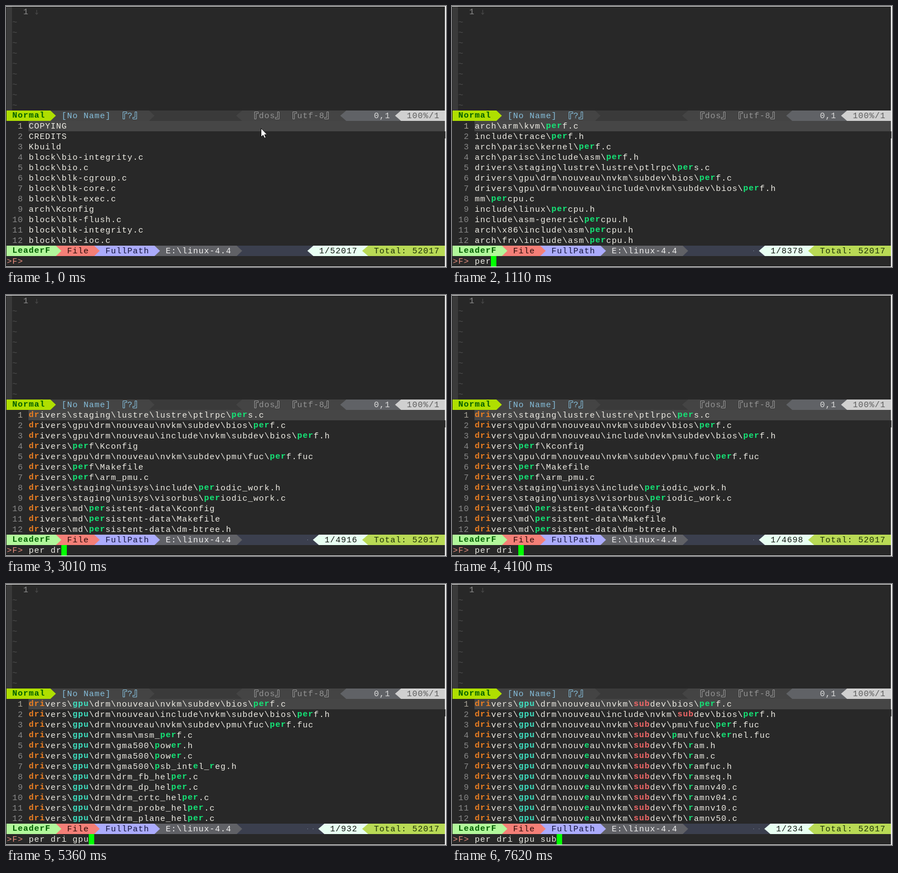
Animation, 803 px wide and 477 px high, one loop 8 s. Source, as an HTML page:

```html
<!DOCTYPE html>
<html lang="en">
<head>
<meta charset="utf-8">
<title>Fuzzy file finder</title>
<style>
html, body { margin: 0; width: 100%; height: 100%; overflow: hidden; background: #282828; }
svg { display: block; width: 803px; height: 477px; }
text { font: 15px "Liberation Mono", "Courier New", monospace; letter-spacing: 0.9985px; white-space: pre; }
.b, .per, .dri, .gpu, .sub { font-weight: bold; }
.per, .dri, .gpu, .sub { baseline-shift: 1px; }
.b { transform: translateY(-1px); }
.per { fill: #14e878; }
.dri { fill: #ec7f22; }
.gpu { fill: #3fe3c3; }
.sub { fill: #f26868; }
</style>
</head>
<body>
<svg id="stage" viewBox="0 0 803 477"></svg>
<script>
const LOOP = 8000;
const X = col => 1 + 10 * col;
const Y = row => 1 + 19 * row;
const lines = strings => strings.raw[0].trim().split("\n");

// Match markers: {per} (gpu) <sub>; the "dri" prefix is marked when drawn.
const start = lines`
COPYING
CREDITS
Kbuild
block\bio-integrity.c
block\bio.c
block\blk-cgroup.c
block\blk-core.c
block\blk-exec.c
arch\Kconfig
block\blk-flush.c
block\blk-integrity.c
block\blk-ioc.c`;

const per = lines`
arch\arm\kvm\{per}f.c
include\trace\{per}f.h
arch\parisc\kernel\{per}f.c
arch\parisc\include\asm\{per}f.h
drivers\staging\lustre\lustre\ptlrpc\{per}s.c
drivers\gpu\drm\nouveau\nvkm\subdev\bios\{per}f.c
drivers\gpu\drm\nouveau\include\nvkm\subdev\bios\{per}f.h
mm\{per}cpu.c
include\linux\{per}cpu.h
include\asm-generic\{per}cpu.h
arch\x86\include\asm\{per}cpu.h
arch\frv\include\asm\{per}cpu.h`;

const dri = lines`
drivers\staging\lustre\lustre\ptlrpc\{per}s.c
drivers\gpu\drm\nouveau\nvkm\subdev\bios\{per}f.c
drivers\gpu\drm\nouveau\include\nvkm\subdev\bios\{per}f.h
drivers\{per}f\Kconfig
drivers\gpu\drm\nouveau\nvkm\subdev\pmu\fuc\{per}f.fuc
drivers\{per}f\Makefile
drivers\{per}f\arm_pmu.c
drivers\staging\unisys\include\{per}iodic_work.h
drivers\staging\unisys\visorbus\{per}iodic_work.c
drivers\md\{per}sistent-data\Kconfig
drivers\md\{per}sistent-data\Makefile
drivers\md\{per}sistent-data\dm-btree.h`;

const g = lines`
drivers\(g)pu\drm\nouveau\nvkm\subdev\bios\{per}f.c
drivers\(g)pu\drm\nouveau\include\nvkm\subdev\bios\{per}f.h
drivers\(g)pu\drm\nouveau\nvkm\subdev\pmu\fuc\{per}f.fuc
drivers\(g)pu\drm\msm\msm_{per}f.c
drivers\sta(g)ing\lustre\lustre\ptlrpc\{per}s.c
drivers\{per}f\Kconfi(g)
drivers\clk\tegra\clk-{per}iph-(g)ate.c
drivers\devfreq\(g)overnor_{per}formance.c
drivers\sta(g)ing\unisys\include\{per}iodic_work.h
drivers\sta(g)ing\unisys\visorbus\{per}iodic_work.c
drivers\md\{per}sistent-data\Kconfi(g)
drivers\md\{per}sistent-data\dm-block-mana(g)er.c`;

const gpu = lines`
drivers\(gpu)\drm\nouveau\nvkm\subdev\bios\{per}f.c
drivers\(gpu)\drm\nouveau\include\nvkm\subdev\bios\{per}f.h
drivers\(gpu)\drm\nouveau\nvkm\subdev\pmu\fuc\{per}f.fuc
drivers\(gpu)\drm\msm\msm_{per}f.c
drivers\(gpu)\drm\gma500\{p}ow{er}.h
drivers\(gpu)\drm\gma500\{p}ow{er}.c
drivers\(gpu)\drm\gma500\{p}sb_int{e}l_{r}eg.h
drivers\(gpu)\drm\drm_fb_hel{per}.c
drivers\(gpu)\drm\drm_dp_hel{per}.c
drivers\(gpu)\drm\drm_crtc_hel{per}.c
drivers\(gpu)\drm\drm_probe_hel{per}.c
drivers\(gpu)\drm\drm_plane_hel{per}.c`;

const kernel = String.raw`drivers\(gpu)\drm\nouveau\nvkm\<s>ubdev\{p}mu\fuc\k{er}nel.fuc`;
const sdvo = String.raw`drivers\(gpu)\drm\gma500\{p}sb_int{e}l_<s>dvo_{r}egs.h`;
const markS = row => row.includes("subdev")
  ? row.replace("subdev", "<s>ubdev") : row.replace("drivers", "driver<s>");
const s = [...gpu.slice(0, 6).map(markS), kernel, sdvo, ...gpu.slice(6, 10).map(markS)];
const su = s.map(row => row.includes("<s>ubdev")
  ? row.replace("<s>u", "<su>")
  : row.replace("<s>dvo", "sdvo").replace(/^driver(s|<s>)\\\(gpu\)/, "driver<s>\\(gp)<u>"));
const ram = "am.h am.c amfuc.h amseq.h amnv40.c amnv04.c amnv10.c amnv50.c".split(" ")
  .map(end => String.raw`drivers\(gpu)\drm\nouv{e}au\nvkm\<sub>dev\fb\{r}` + end);
const sub = [...s.slice(0, 3), kernel].map(row => row.replace("<s>ub", "<sub>")).concat(ram);
const swap = (rows, from, to) => rows.map(row => row.replace(from, to));

// [time, query, cursor shown, matches, rows]
const steps = [
  [0, "", 0, 52017, start],
  [410, "", 1, 52017, start],
  [720, "p", 1, 31264, swap(per, "{per}", "{p}er")],
  [840, "pe", 1, 21873, swap(per, "{per}", "{pe}r")],
  [1110, "per", 1, 8378, per],
  [1640, "per", 0, 8378, per],
  [1910, "per ", 1, 8378, per],
  [2370, "per ", 0, 8378, per],
  [2640, "per d", 1, 6142, dri],
  [3010, "per dr", 1, 4916, dri],
  [3290, "per dri", 1, 4698, dri],
  [3820, "per dri", 0, 4698, dri],
  [4100, "per dri ", 1, 4698, dri],
  [4500, "per dri ", 0, 4698, dri],
  [4780, "per dri g", 1, 1794, g],
  [5090, "per dri gp", 1, 1013, swap(gpu, "(gpu)", "(gp)u")],
  [5360, "per dri gpu", 1, 932, gpu],
  [5920, "per dri gpu", 0, 932, gpu],
  [6230, "per dri gpu ", 1, 932, gpu],
  [6820, "per dri gpu s", 1, 931, s],
  [7190, "per dri gpu su", 1, 931, su],
  [7620, "per dri gpu sub", 1, 234, sub]
];

const rect = (x, y, w, h, fill) =>
  `<rect x="${x}" y="${y}" width="${w}" height="${h}" fill="${fill}"/>`;
const text = (col, row, str, fill, cls = "") =>
  `<text x="${X(col) + 0.5}" y="${Y(row) + 14}" fill="${fill}" class="${cls}">${str}</text>`;

// Status segment whose slanted end points right (dir 1) or left (dir -1).
function segment(from, to, row, fill, dir) {
  const a = X(from), b = X(to), y = Y(row);
  const [flat, edge, tip] = dir > 0 ? [a, b, b + 10] : [b, a, a - 11];
  return `<path fill="${fill}" d="M${flat} ${y}H${edge}L${tip} ${y + 9.5}L${edge} ${y + 19}H${flat}z"/>`;
}

function bracketed(col, str, fill) {
  const hook = (c, turn) => `<path transform="translate(${X(c)} 191)${turn}" fill="none" stroke="${fill}" d="M2.5 15.5V2.5H9.5V5.5H5.5V15.5z"/>`;
  return hook(col, "") + text(col + 1, 10, str, fill)
    + hook(col + 1 + str.length, " rotate(180 5 9)");
}

function backdrop() {
  let out = rect(0, 0, 803, 477, "#282828") + rect(1, 1, 10, 190, "#3a3a3a")
    + text(3, 0, "1", "#8e8e8e")
    + '<path d="M56 7V15M53.5 12.5L56 15.5L58.5 12.5" fill="none" stroke="#505050"/>';
  for (let i = 1; i < 10; i++) out += text(1, i, "~", "#505050");

  out += rect(1, 191, 800, 19, "#3a3a3a")
    + segment(8, 26, 10, "#444444", 1) + segment(0, 8, 10, "#afdf00", 1)
    + text(1, 10, "Normal", "#005f00", "b")
    + text(10, 10, "[No Name]", "#86bfdc") + bracketed(21, "?", "#86bfdc")
    + segment(43, 80, 10, "#444444", -1)
    + bracketed(45, "dos", "#959595") + bracketed(52, "utf-8", "#959595")
    + segment(62, 80, 10, "#606266", -1) + text(67, 10, "0,1", "#dcdcdc")
    + segment(72, 80, 10, "#d0d0d0", -1) + text(73, 10, "100%/1", "#5c5c5c");

  out += rect(41, 210, 760, 19, "#464646");
  for (let i = 1; i <= 12; i++)
    out += text(1, 10 + i, String(i).padStart(2), i > 1 ? "#8a8a8a" : "#aaa69a");

  out += rect(1, 438, 800, 19, "#3b3f4e")
    + segment(27, 42, 23, "#606166", 1) + text(29, 23, "E:\\linux-4.4", "#f0f0f0")
    + segment(16, 27, 23, "#ababfc", 1) + text(18, 23, "FullPath", "#14143c")
    + segment(9, 16, 23, "#f47f77", 1) + text(11, 23, "File", "#280a08")
    + segment(0, 9, 23, "#b2f79b", 1) + text(1, 23, "LeaderF", "#005f00", "b");
  return out + text(0, 24, "&gt;F&gt;", "#ea9080")
    + rect(0, 0, 803, 1, "#f0f0f0") + rect(0, 476, 803, 1, "#f0f0f0")
    + rect(801, 0, 2, 477, "#f0f0f0") + rect(801, 229, 1, 13, "#383838");
}

const marks = { "{": "per", "[": "dri", "(": "gpu", "<": "sub" };
const paint = row => row.replace(/([{[(<])([^\])}>]+)[\])}>]/g,
  (_, open, str) => `<tspan class="${marks[open]}">${str}</tspan>`);

function content([, query, cursor, count, rows]) {
  const prefix = query.split(" ")[1] || "";
  let out = rows.map((row, i) => {
    if (prefix) row = row.replace(prefix, `[${prefix}]`);
    return text(4, 11 + i, paint(row), "#f0eee6");
  }).join("");

  const label = "1/" + count, col = 64 - label.length;
  for (let c = 55; c < col - 2; c++) out += rect(X(c) - 1, 447, 1, 1, "#8c98a8");
  out += segment(col - 1, 66, 23, "#e8fff2", -1) + text(col, 23, label, "#101410")
    + segment(66, 80, 23, "#b9da55", -1) + text(67, 23, "Total: 52017", "#1e3208")
    + text(4, 24, query, "#eeeee6");
  if (cursor) out += rect(X(4 + query.length), 457, 10, 19, "#00ff00");
  return out;
}

const stage = document.getElementById("stage");
stage.innerHTML = backdrop() + '<g id="live"></g>'
  + '<path id="pointer" fill="#fff" stroke="#101010" d="M465.5 223.5V239.5L469.2 236L471.8 241.5L474.3 240.4L471.8 235H476.5z"/>';
const live = document.getElementById("live");
const pointer = document.getElementById("pointer");
let shown = null;

function render(time) {
  const step = steps.findLast(item => item[0] <= time);
  if (step !== shown) live.innerHTML = content(shown = step);
  pointer.style.display = time < 560 ? "" : "none";
}

const origin = performance.now();
function tick() {
  render((performance.now() - origin) % LOOP);
  requestAnimationFrame(tick);
}
tick();
</script>
</body>
</html>
```
